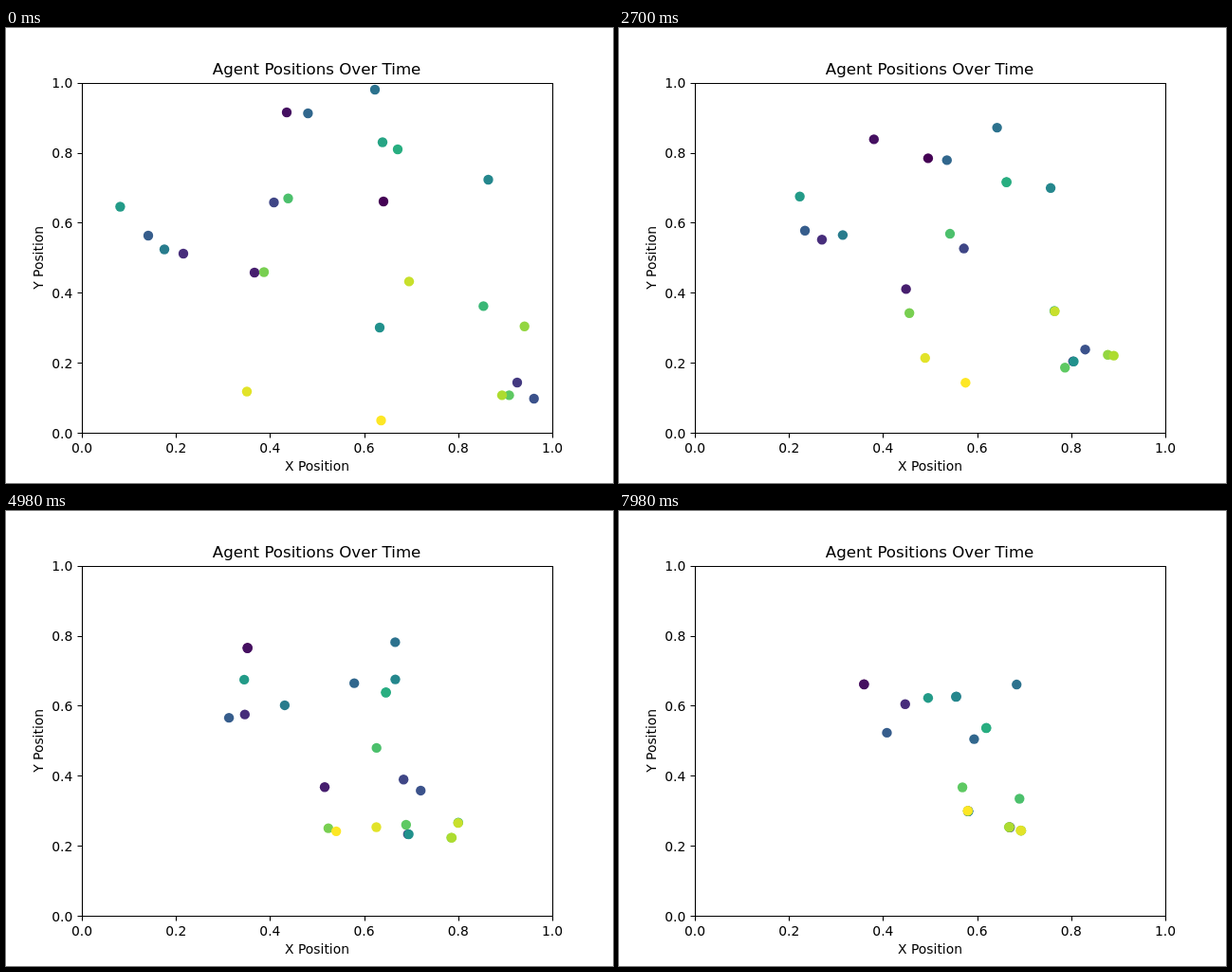
Write an HTML page that moves like this. It is 640 by 480 pixels and loops after 8 s.

```html
<!DOCTYPE html>
<html lang="en">
<head>
<meta charset="utf-8">
<title>Agent Positions Over Time</title>
<style>
  html, body { margin: 0; width: 100%; height: 100%; overflow: hidden; background: #fff; }
  svg { display: block; width: 640px; height: 480px; }
  text { font: 13.89px "DejaVu Sans", sans-serif; text-anchor: middle; }
  .title { font-size: 16.67px; }
  .y-tick { text-anchor: end; }
  .axes { fill: none; stroke: #000; stroke-width: 1.11; }
</style>
</head>
<body>
<svg id="chart" viewBox="0 0 640 480">
  <text class="title" x="327.6" y="49">Agent Positions Over Time</text>
  <text x="328" y="467">X Position</text>
  <text transform="translate(39 242.4) rotate(-90)">Y Position</text>
</svg>
<script>
const STEP_MS = 60, LOOP_MS = 8000, SUBSTEPS = 2;
const LEFT = 80, TOP = 57.6, WIDTH = 496, HEIGHT = 369.6;

// Paces in plot widths per step.
const SLOW = 0.0021, CALM = 0.00245, EVEN = 0.00275, STEADY = 0.00302, BRISK = 0.00322;
const QUICK = 0.00376, FAST = 0.00427, RUSH = 0.00467, DASH = 0.00725;

// Each agent: start x and y in pixels, the agent it chases, its pace.
const AGENTS = [
  [398, 183, 1, FAST], [296, 89, 7, SLOW], [262, 258, 12, SLOW], [187, 238, 10, SLOW],
  [539, 374, 19, STEADY], [282.5, 184, 20, RUSH], [556.7, 391, 5, FAST], [150, 219, 17, SLOW],
  [318.4, 90, 12, BRISK], [389, 65, 22, CALM], [167, 233.5, 11, BRISK], [508.5, 160, 7, CALM],
  [394, 316, 4, DASH], [120.4, 188.5, 14, BRISK], [397, 120.5, 15, BRISK], [413, 128, 24, SLOW],
  [503.4, 293.4, 22, BRISK], [297.5, 179.7, 22, BRISK], [530.5, 387.4, 7, BRISK], [272, 257.5, 24, STEADY],
  [546.7, 314.8, 4, CALM], [523, 387.4, 20, EVEN], [425, 267.4, 21, CALM], [254, 383.5, 22, QUICK],
  [395.5, 414, 2, EVEN]
];
const VIRIDIS = ["440154", "472d7b", "3b528b", "2c728e", "21918c", "28ae80", "5ec962", "addc30", "fde725"]
  .map(hex => hex.match(/../g).map(pair => parseInt(pair, 16)));

const chart = document.getElementById("chart");

function add(tag, attributes, content = "") {
  const node = document.createElementNS(chart.namespaceURI, tag);
  for (const name in attributes) node.setAttribute(name, attributes[name]);
  node.textContent = content;
  return chart.appendChild(node);
}

function viridis(fraction) {
  const position = fraction * (VIRIDIS.length - 1);
  const low = Math.min(Math.floor(position), VIRIDIS.length - 2);
  const mixed = VIRIDIS[low].map((c, k) => Math.round(c + (VIRIDIS[low + 1][k] - c) * (position - low)));
  return `rgb(${mixed})`;
}

// All agents move at once, each straight toward its target's last position.
function advance(points) {
  return points.map(([x, y], i) => {
    const [, , target, pace] = AGENTS[i];
    const dx = points[target][0] - x, dy = points[target][1] - y;
    const distance = Math.hypot(dx / WIDTH, dy / HEIGHT);
    const share = distance > 0 ? Math.min(1, pace / SUBSTEPS / distance) : 0;
    return [x + dx * share, y + dy * share];
  });
}

function simulate() {
  const states = [AGENTS.map(([x, y]) => [x, y])];
  while (states.length * STEP_MS < LOOP_MS) {
    let points = states[states.length - 1];
    for (let i = 0; i < SUBSTEPS; i++) points = advance(points);
    states.push(points);
  }
  return states;
}

const snap = value => Math.round(value) + 0.5;

function drawAxes() {
  let path = "M80.5 58.5H576.5V427.5H80.5Z";
  for (let i = 0; i <= 5; i++) {
    const x = LEFT + WIDTH * i / 5, y = TOP + HEIGHT * (1 - i / 5);
    const label = (i / 5).toFixed(1);
    path += `M${snap(x)} 427.5v5M80.5 ${snap(y)}h-5`;
    add("text", { x, y: 448 }, label);
    add("text", { x: 70.3, y: y + 5.3, class: "y-tick" }, label);
  }
  add("path", { d: path, class: "axes" });
}

const states = simulate();
const dots = AGENTS.map((_, i) => add("circle", { r: 5.2, fill: viridis(i / (AGENTS.length - 1)) }));
drawAxes();

function render() {
  const state = states[Math.floor(performance.now() % LOOP_MS / STEP_MS)];
  dots.forEach((dot, i) => {
    dot.setAttribute("cx", state[i][0]);
    dot.setAttribute("cy", state[i][1]);
  });
  requestAnimationFrame(render);
}
render();
</script>
</body>
</html>
```
